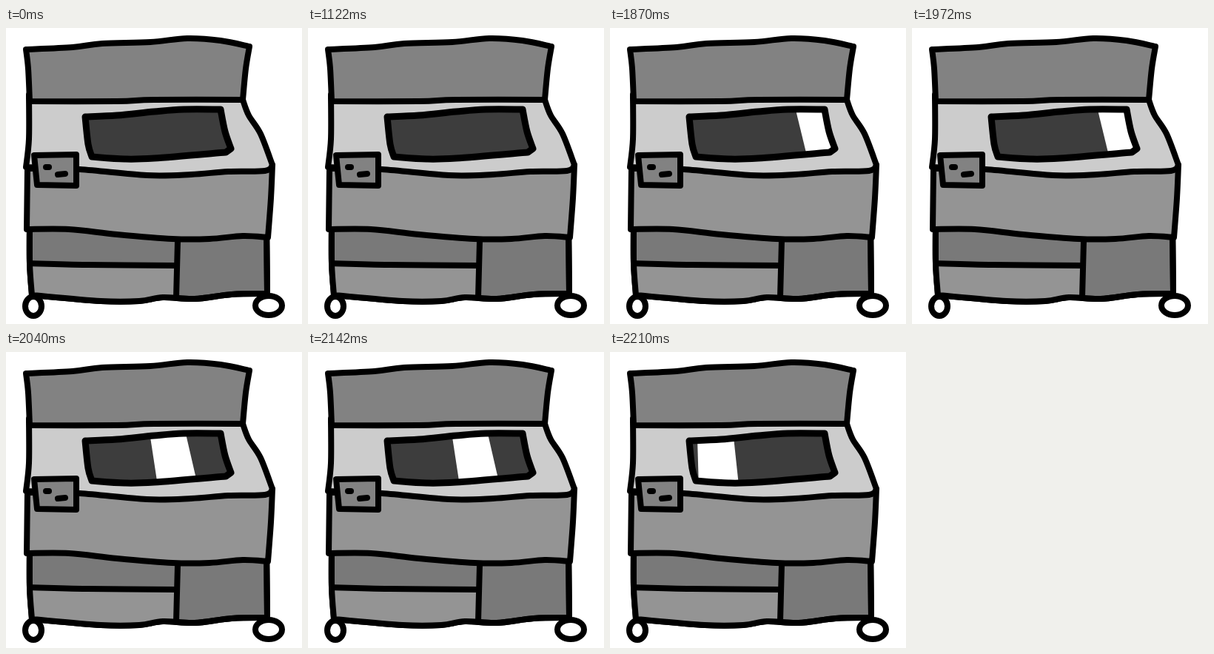
Animation, 400 px wide and 400 px high, one loop 2.38 s. Source, as an HTML page with a canvas:

```html
<!DOCTYPE html>
<html>
<head>
<meta charset="utf-8">
<style>
html, body { margin: 0; width: 100%; height: 100%; overflow: hidden; background: #fff; }
canvas { display: block; }
</style>
</head>
<body>
<canvas id="stage" width="400" height="400"></canvas>
<script>
const ctx = document.getElementById('stage').getContext('2d');
const LOOP = 2380, REST = 1870, STEP = 170;
const DARK = '#797979', MID = '#949494', PANEL = '#828282', LIGHT = '#cccccc';

// Smooth curve through the key points of one edge, "x,y x,y ..."
function trace(path, edge, first) {
  const pts = edge.split(' ').map(p => p.split(',').map(Number));
  const at = i => pts[Math.max(0, Math.min(pts.length - 1, i))];
  const mix = (p, a, b) => [0, 1].map(k => p[k] + (b[k] - a[k]) / 6);
  if (first) path.moveTo(...pts[0]);
  else path.lineTo(...pts[0]);
  for (let i = 0; i < pts.length - 1; i++) {
    const from = at(i), to = at(i + 1);
    path.bezierCurveTo(...mix(from, at(i - 1), to), ...mix(to, at(i + 2), from), ...to);
  }
}

// Closed face: smooth edges that meet in corners
function face(...edges) {
  const path = new Path2D();
  edges.forEach((e, i) => trace(path, e, i === 0));
  path.closePath();
  return path;
}

function outline(path, width = 8) {
  ctx.lineWidth = width;
  ctx.stroke(path);
}

function paint(fill, path) {
  ctx.fillStyle = fill;
  ctx.fill(path);
  outline(path);
}

function line(edge) {
  const path = new Path2D();
  trace(path, edge, true);
  outline(path);
}

function inside(path, drawing) {
  ctx.save();
  ctx.clip(path);
  drawing();
  ctx.restore();
}

function wheel(x, y, rx, ry) {
  const path = new Path2D();
  path.ellipse(x, y, rx, ry, 0, 0, Math.PI * 2);
  paint('#fff', path);
}

const cabinet = face('32,260 32,318 35,361', '35,361 128,369 180,369 212,364 255,366 305,360 353,359', '353,359 352,260');
const body = face('29,190 28,272', '28,272 85,272 150,279 225,285 275,285 320,281 354,283', '354,283 358,230 360,185');
const top_ = face('31,90 31,150 27,188', '27,188 100,191 190,199 250,198 300,194 350,193 360,185', '360,185 344,143 328,118 320,97');
const back = face('27,29 90,26 130,21 195,19 245,14 290,17 329,25', '329,25 324,55 320,97', '320,97 200,97 150,99 32,99', '32,99 30,55 27,29');
const glass = face('107,120 150,118 200,113 240,110 290,110', '290,110 296,140 304,163', '304,163 297,168', '297,168 200,176 160,177 116,174', '116,174 111,157 107,120');
const box = face('38,172 95,171', '95,213 42,212');

// Light bar: speeds up to the left, edges lean more towards the right
function bar(step) {
  const left = 252 - 47 * step - 10 * step * step;
  const lean = (x, y) => x + (x - 100) * 0.085 * (y - 115) / 53;
  const right = left + 49;
  ctx.fillStyle = '#fff';
  ctx.beginPath();
  ctx.moveTo(lean(left, 105), 105);
  ctx.lineTo(lean(right, 105), 105);
  ctx.lineTo(lean(right, 180), 180);
  ctx.lineTo(lean(left, 180), 180);
  ctx.fill();
}

function draw(step) {
  ctx.fillStyle = '#fff';
  ctx.fillRect(0, 0, 400, 400);
  ctx.strokeStyle = '#000';
  ctx.lineCap = ctx.lineJoin = 'round';

  paint(DARK, cabinet);
  inside(cabinet, () => {
    ctx.fillStyle = MID;
    ctx.fillRect(0, 320, 231, 80);
  });
  outline(cabinet);
  line('32,318 110,320 229,321');
  line('232,288 230,364');

  paint(MID, body);
  paint(LIGHT, top_);
  paint(PANEL, back);

  ctx.fillStyle = '#3d3d3d';
  ctx.fill(glass);
  if (step >= 0) inside(glass, () => bar(step));
  outline(glass, 9);

  paint(PANEL, box);
  line('54,188 58,188');
  line('70,198 80,197');

  wheel(37, 376, 11, 13);
  wheel(355, 375, 18, 13);
}

let shown;
function tick() {
  const t = performance.now() % LOOP;
  const step = t < REST ? -1 : Math.min(2, Math.floor((t - REST) / STEP));
  if (step !== shown) draw(shown = step);
  requestAnimationFrame(tick);
}
tick();
</script>
</body>
</html>
```
